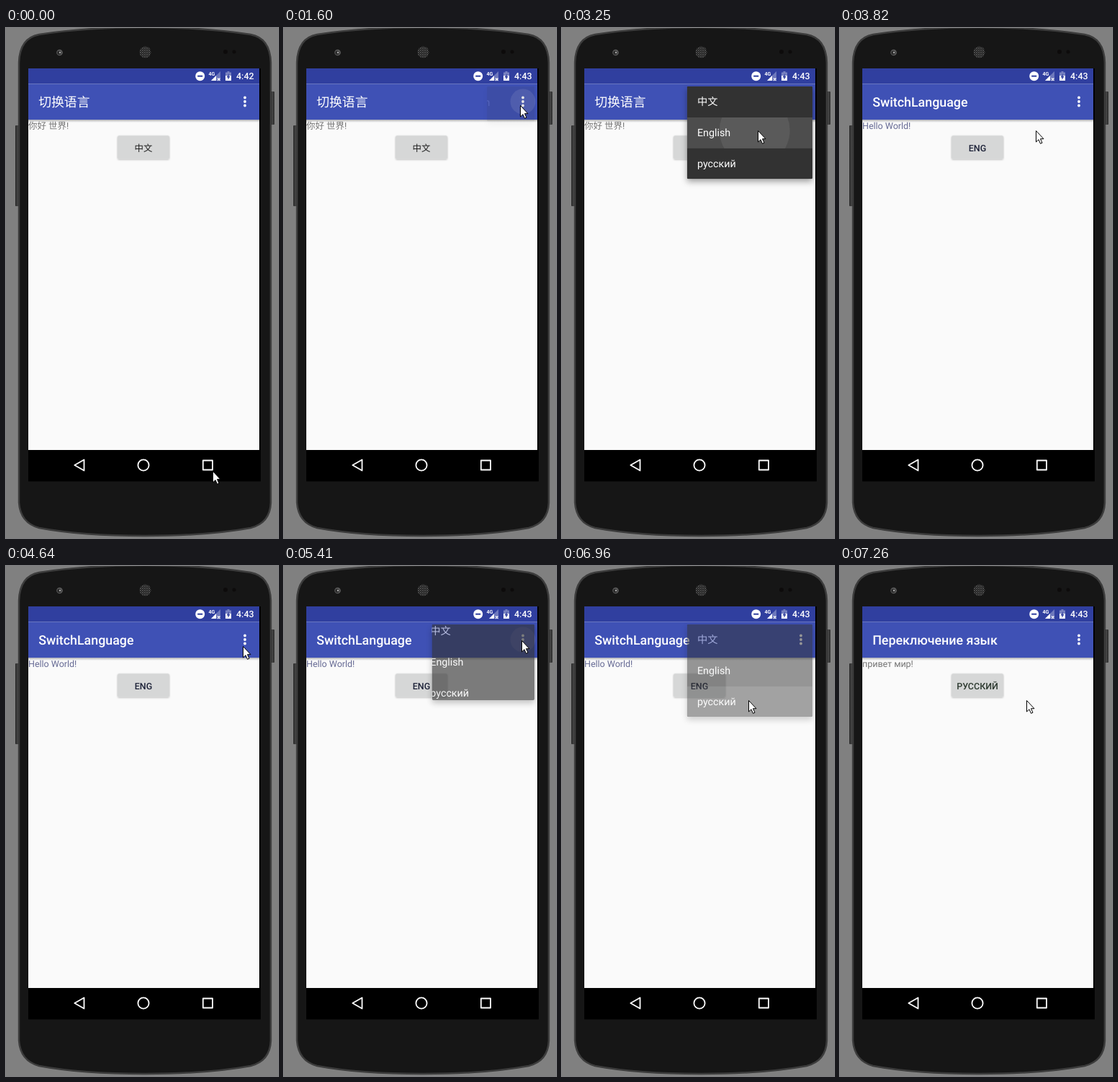
An HTML page that plays this animation: 378 px wide and 707 px high, repeating every 8 s.

```html
<!DOCTYPE html>
<html lang="zh-CN">
<head>
<meta charset="utf-8">
<style>
html, body { margin: 0; width: 100%; height: 100%; overflow: hidden; background: #808080 }
svg { display: block }
text { font-family: Roboto, "Noto Sans CJK SC", "Noto Sans CJK", sans-serif; text-rendering: geometricPrecision }
.bold { font-weight: 500 }
</style>
</head>
<body>
<svg width="378" height="707" viewBox="0 0 378 707">
  <defs>
    <pattern id="mesh" width="3" height="3" patternUnits="userSpaceOnUse">
      <rect width="3" height="3" fill="#1c1c1c"/>
      <circle cx="1" cy="1" r=".9" fill="#606060"/>
      <circle cx="2.5" cy="2.5" r=".6" fill="#4a4a4a"/>
    </pattern>
    <linearGradient id="side"><stop stop-color="#1a1a1a"/><stop offset=".5" stop-color="#484848"/><stop offset="1" stop-color="#222"/></linearGradient>
    <linearGradient id="shade" x2="0" y2="1"><stop stop-opacity=".28"/><stop offset="1" stop-opacity="0"/></linearGradient>
    <filter id="lift" x="-20%" y="-20%" width="140%" height="150%"><feDropShadow dx="0" dy="4" stdDeviation="4.500" flood-opacity=".36"/></filter>
    <filter id="low" x="-10%" y="-20%" width="120%" height="150%"><feDropShadow dx="0" dy=".8" stdDeviation=".8" flood-opacity=".28"/></filter>
  </defs>

  <!-- handset -->
  <rect x="13" y="135" width="5" height="112" rx="1" fill="url(#side)"/>
  <rect x="368" y="88" width="5" height="46" rx="1" fill="url(#side)"/>
  <path fill="#161616" stroke="#3c3c3c" stroke-width="2.500" d="M18 350V48Q19 14 46 9Q110-1 193-1Q276-1 340 9Q367 14 368 48V658Q367 686 340 693Q280 704 193 704Q105 704 46 693Q20 686 18 658Z"/>
  <circle cx="74.500" cy="34" r="4.300" fill="#5a5a5a"/>
  <circle cx="74" cy="34.300" r="2.800" fill="#2b2b2b"/>
  <circle cx="75" cy="34" r="1.200" fill="#aaa"/>
  <circle cx="193.500" cy="33.500" r="8" fill="url(#mesh)"/>
  <g fill="#0d0b0b"><circle cx="305" cy="33" r="3"/><circle cx="317" cy="33" r="2.500"/></g>

  <!-- screen -->
  <rect x="31" y="56" width="323" height="572.500"/>
  <rect x="31" y="56" width="321" height="529" fill="#fafafa"/>
  <rect x="31" y="127" width="321" height="4" fill="url(#shade)"/>
  <rect x="31" y="56" width="321" height="21.400" fill="#303f9f"/>
  <rect x="31" y="77.400" width="321" height="49.700" fill="#3f51b5"/>

  <g fill="#fff">
    <circle cx="269.700" cy="66.700" r="6.500"/>
    <rect x="266.200" y="65.700" width="7" height="2" fill="#303f9f"/>
    <text x="281.500" y="66" font-size="7" font-weight="700">4G</text>
    <path d="M298 60V73H285Z" opacity=".3"/>
    <path d="M292 66V73H285Z"/>
    <path d="M294 69.500L297.500 73M297.500 69.500L294 73" stroke="#fff" stroke-width="1.200"/>
    <path d="M305 61.500H307.500V60H310.500V61.500H313V73H305Z" opacity=".35"/>
    <path d="M305 66H313V73H305Z"/>
    <path d="M310 63L306.500 68.500H308.500V72L311.500 66.800H309.500Z" fill="#303f9f"/>
    <text id="clock" class="bold" x="320" y="71.300" font-size="12.480"></text>
    <text id="title" class="bold" x="45.200" y="108.700" font-size="17.830"></text>
    <circle id="press" cx="332" cy="102" r="17.500" opacity=".1"/>
    <circle cx="332" cy="96.500" r="1.900"/><circle cx="332" cy="102" r="1.900"/><circle cx="332" cy="107.500" r="1.900"/>
  </g>

  <text id="hello" x="31" y="140.300" font-size="12.480"></text>
  <rect x="155" y="149.300" width="72" height="32.400" rx="2" fill="#d6d7d7" filter="url(#low)"/>
  <text id="label" class="bold" x="191" y="170.500" font-size="12.480" text-anchor="middle"></text>

  <g id="popup" filter="url(#lift)">
    <svg id="clip">
      <rect width="100%" height="100%" rx="1.800" fill="#303030"/>
      <g id="items" fill="#fff" font-size="14.270">
        <rect id="glow" width="174.500" height="43" opacity=".14"/>
        <svg id="rowClip" width="174.500" height="43"><circle id="ripple" opacity=".07"/></svg>
        <text x="14.300" y="26.300">中文</text>
        <text x="14.300" y="69.300">English</text>
        <text x="14.300" y="112.300">русский</text>
      </g>
    </svg>
  </g>

  <g fill="none" stroke="#fff" stroke-width="1.800" stroke-linejoin="round">
    <path d="M95.300 606L108.500 598.500V613.500Z"/>
    <circle cx="191" cy="606" r="7.600"/>
    <rect x="273.800" y="599.500" width="13.200" height="13"/>
  </g>

  <path id="cursor" d="M.5 .5V16L4 12.700L6.500 18.300L9 17.200L6.500 11.700H11Z" fill="#fff" stroke="#000"/>
</svg>

<script>
const $ = id => document.getElementById(id);
const set = (id, attrs) => { for (const k in attrs) $(id).setAttribute(k, attrs[k]); };
const show = (id, on) => set(id, { visibility: on ? 'inherit' : 'hidden' });
const within = (t, a, b) => t >= a && t < b;

// Share of a move done at time t, in n equal jumps from a to b.
const jumps = (t, a, b, n) =>
  t < a ? 0 : Math.min(1, (Math.floor((t - a) / (b - a) * (n - 1) + 1e-6) + 1) / n);

const languages = [
  { from: 0, title: '切换语言', hello: '你好 世界!', label: '中文', ink: '#757575', dark: '#1c1c1c' },
  { from: 3820, title: 'SwitchLanguage', hello: 'Hello World!', label: 'ENG', ink: '#666a94', dark: '#1d2238' },
  { from: 7060, title: 'Переключение язык', hello: 'привет мир!', label: 'РУССКИЙ', ink: '#757575', dark: '#2b382e' }
];

// start, end, jumps, x, y
const moves = [
  [430, 1140, 10, 328, 107],
  [2000, 2450, 7, 272, 142],
  [4330, 4640, 5, 329, 111],
  [4716, 4870, 3, 330, 103],
  [5500, 5970, 7, 259, 186]
];

const menus = [
  { open: 1520, close: 3820, gone: 3820, tap: 3150, grow: 3250, fade: 3580, row: 1, x: 94, y: 18, r: 49 },
  { open: 5180, close: 6960, gone: 7160, tap: 6350, grow: 6350, fade: 6570, row: 2, x: 84.5, y: 21, r: 30 }
];

function drawCursor(t) {
  let x = 287, y = 614;
  for (const [a, b, n, toX, toY] of moves) {
    const p = jumps(t, a, b, n), e = p * p * (3 - 2 * p);
    x += (toX - x) * e;
    y += (toY - y) * e;
  }
  set('cursor', { transform: `translate(${Math.round(x)} ${Math.round(y)})` });
}

function drawMenu(t) {
  const m = menus.find(m => within(t, m.open, m.gone));
  show('popup', m);
  show('press', m && t < m.open + 310);
  if (!m) return;

  const p = Math.min(1, Math.floor((t - m.open) / 77.5 + .03) / 4);
  const size = p ** .7, w = 174.5 * size, h = 128.4 * size;
  const alpha = t < m.close ? p ** 1.6 : t < m.close + 100 ? .5 : .2;
  set('popup', { opacity: alpha });
  set('clip', { x: 348.2 - w, y: 80.9, width: w, height: h });
  // Rows slide in from the upper right while the panel uncovers them.
  set('items', { transform: `translate(${w - 174.5 + 84 * (1 - size)} ${-68 * (1 - size)})` });

  show('glow', t >= m.tap);
  set('glow', { y: 43 * m.row });
  set('rowClip', { y: 43 * m.row });
  show('ripple', within(t, m.tap, m.fade));
  set('ripple', { cx: m.x, cy: m.y, r: t < m.grow ? m.r * .6 : m.r });
}

function draw(t) {
  const lang = languages.findLast(l => t >= l.from);
  $('clock').textContent = t < 220 ? '4:42' : '4:43';
  for (const id of ['title', 'hello', 'label']) $(id).textContent = lang[id];
  set('hello', { fill: lang.ink });
  set('label', { fill: lang.dark });
  drawMenu(t);
  drawCursor(t);
}

const start = performance.now();
function tick() {
  draw((performance.now() - start) % 8000);
  requestAnimationFrame(tick);
}
tick();
</script>
</body>
</html>
```
